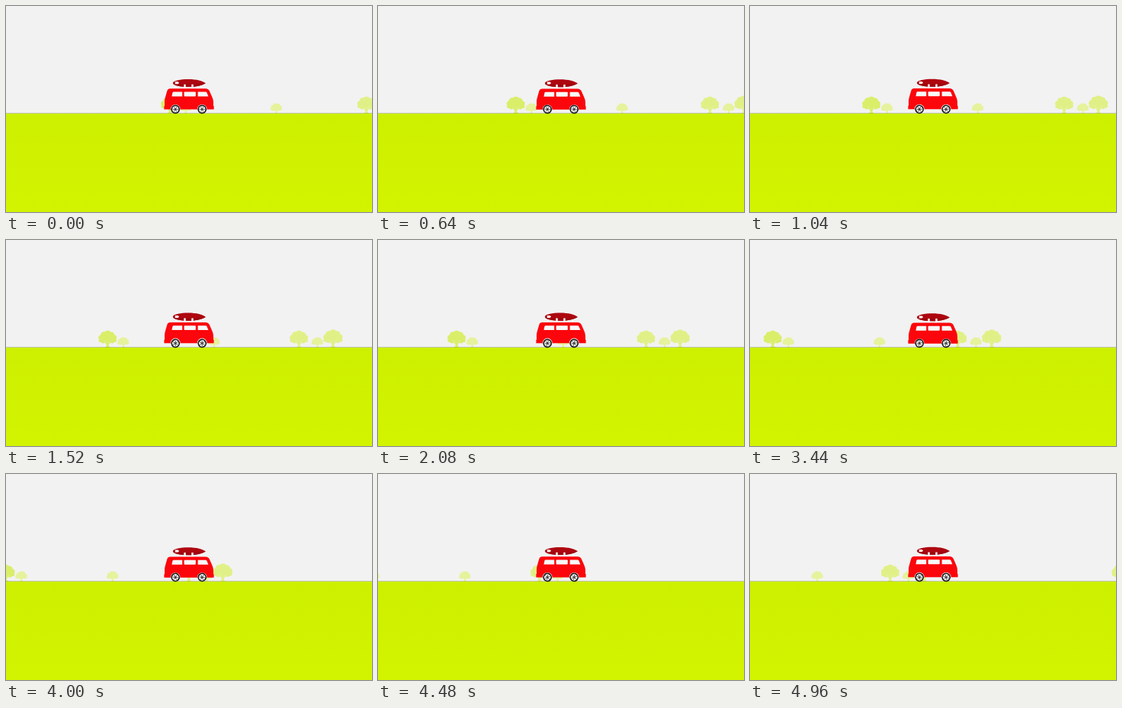
These frames come from a looping animation (480x270 px, 5040 ms). An HTML page:

```html
<!DOCTYPE html>
<html lang="en">
<head>
<meta charset="utf-8">
<title>Van on the road</title>
<style>
html, body { margin: 0; width: 100%; height: 100%; overflow: hidden; background: #f2f2f2; }
svg { display: block; width: 100vw; height: 100vh; }
</style>
</head>
<body>
<svg viewBox="0 0 480 270" preserveAspectRatio="none">
  <defs>
    <linearGradient id="grass" x1="0" y1="0" x2="0" y2="1">
      <stop offset="0" stop-color="#cdf000"/>
      <stop offset="1" stop-color="#d2f400"/>
    </linearGradient>
    <!-- Trees stand on the origin -->
    <g id="big">
      <path d="M-8.5-7C-11-6.5-12.5-9-11.3-11C-13-13.5-11-16.5-9-16.8C-9-19.5-6-21.2-4-20.5C-2-22.8 2.5-22.8 4-20.5C6.5-21 9-19 9-16.8C11.5-16 12.8-13.5 11.3-11C12.5-8.5 11-6.5 8.5-7C7-5 4.5-5.5 3.8-6.5L1.6-4.2V-2L3.5 0H-3.5L-1.6-2V-4.2L-3.8-6.5C-4.5-5.5-7-5-8.5-7Z"/>
      <path d="M-5-9.5L-.8-6M5-9.5L.8-6" fill="none" stroke="#f2f2f2" stroke-opacity=".45" stroke-width=".7"/>
    </g>
    <g id="small">
      <path d="M-5.5-4.2C-8-4-8.5-7-7-8.3C-7-10.5-5.5-11.6-4.2-11.6C-3-13.8 0-14 1.2-13C3-13.6 5-12.2 5-10.8C7-10.5 7.8-8.5 7-7.2C8.3-5.5 7-3.8 5.3-4.2C4-3 3-3.4 2.2-4.2L1-2.8V-1.5L2 0H-2L-1-1.5V-2.8L-2.2-4.2C-3-3.2-4.5-3-5.5-4.2Z"/>
    </g>
    <g id="wheel">
      <circle r="5.8" fill="#181818"/>
      <circle r="4.1" fill="#f6f6f6"/>
      <path d="M-3.5 0H3.5M-1.75-3.03L1.75 3.03M-1.75 3.03L1.75-3.03" stroke="#333" stroke-width=".8"/>
      <circle r="1.1" fill="#333"/>
    </g>
  </defs>
  <rect width="480" height="270" fill="#f2f2f2"/>
  <g id="trees"></g>
  <rect y="141" width="480" height="129" fill="url(#grass)"/>
  <rect y="140.3" width="480" height=".7" fill="#7d8440" opacity=".6"/>
  <g id="body">
    <path d="M218.8 100.3C219.5 97 229 95.4 239 95.4C250 95.4 258 97.6 262 100.8C257 104 249 105.6 239 105.5C228 105.4 219.5 103.6 218.8 100.3Z" fill="#ae0710"/>
    <path d="M219 101C226 102.5 247 103 261.5 100.8C257 104 249 105.6 239 105.5C228 105.4 219.7 103.8 219 101Z" fill="#9f060e"/>
    <path d="M221.3 98.8h4.2l1.6 1.5-1.6 1.5h-4.2l1-1.5z" fill="#fff"/>
    <path d="M233.3 102.2h2.4v5.6h-2.4zM243.3 102.2h2.4v5.6h-2.4z" fill="#fff"/>
    <path d="M215.5 107.8H261.5C264.5 107.8 266 109 267 111.2L270.4 119C271.6 121.6 272 124 272 127V130.5H272.6V135H207.4V130.5H208V125C208 122 208.8 119.5 209.5 117L211.2 111.2C211.9 108.8 213.2 107.8 215.5 107.8Z" fill="#fb060c"/>
    <g fill="#f7f7f7">
      <path d="M219.8 112H231.2V117.9H217.4L218.4 113.2Q218.7 112 219.8 112Z"/>
      <rect x="233.6" y="112" width="15.2" height="5.9" rx=".8"/>
      <path d="M251.6 112H261.8Q263 112 263.5 113.2L265.4 117.9H251.6Z"/>
    </g>
    <path d="M215.8 134.8a6.4 6.4 0 0 1 12.8 0zM250.8 134.8a6.4 6.4 0 0 1 12.8 0z" fill="#f6dede"/>
  </g>
  <g id="wheels"></g>
</svg>
<script>
const NS = "http://www.w3.org/2000/svg";
const LOOP = 5040, STEP = 80, TURN = 630, BOB = 560;
const DEEP = "#daee69", MID = "#e1f086", PALE = "#e6f29c";

// kind, colour, start x, speed in px/ms, scale
const trees = [
  ["small", PALE, 235.8, 0.0539, 1],
  ["big", DEEP, 215.2, 0.0539, 1],
  ["small", PALE, 354.6, 0.0537, 1],
  ["small", PALE, 497.3, 0.0584, 1],
  ["big", MID, 472.6, 0.0582, 1],
  ["big", MID, 517.5, 0.0583, 1.06],
  ["big", MID, 775.5, 0.0583, 1]
];
const wheelX = [222.2, 257.2];

function place(kind, parent) {
  const el = document.createElementNS(NS, "use");
  el.setAttribute("href", "#" + kind);
  return document.getElementById(parent).appendChild(el);
}

const treeEls = trees.map(([kind, colour]) => {
  const el = place(kind, "trees");
  el.setAttribute("fill", colour);
  return el;
});
const wheelEls = wheelX.map(() => place("wheel", "wheels"));
const body = document.getElementById("body");

function draw(ms) {
  const t = Math.floor((ms % LOOP) / STEP) * STEP;
  trees.forEach(([, , x, speed, scale], i) => {
    treeEls[i].setAttribute("transform", `translate(${x - speed * t} 141) scale(${scale})`);
  });
  wheelX.forEach((x, i) => {
    wheelEls[i].setAttribute("transform", `translate(${x} 135.4) rotate(${360 * t / TURN})`);
  });
  const bob = 0.3 * Math.sin(2 * Math.PI * t / BOB);
  body.setAttribute("transform", `translate(0 ${0.5 + bob})`);
}

const start = performance.now();
function tick() {
  draw(performance.now() - start);
  requestAnimationFrame(tick);
}
tick();
</script>
</body>
</html>
```
